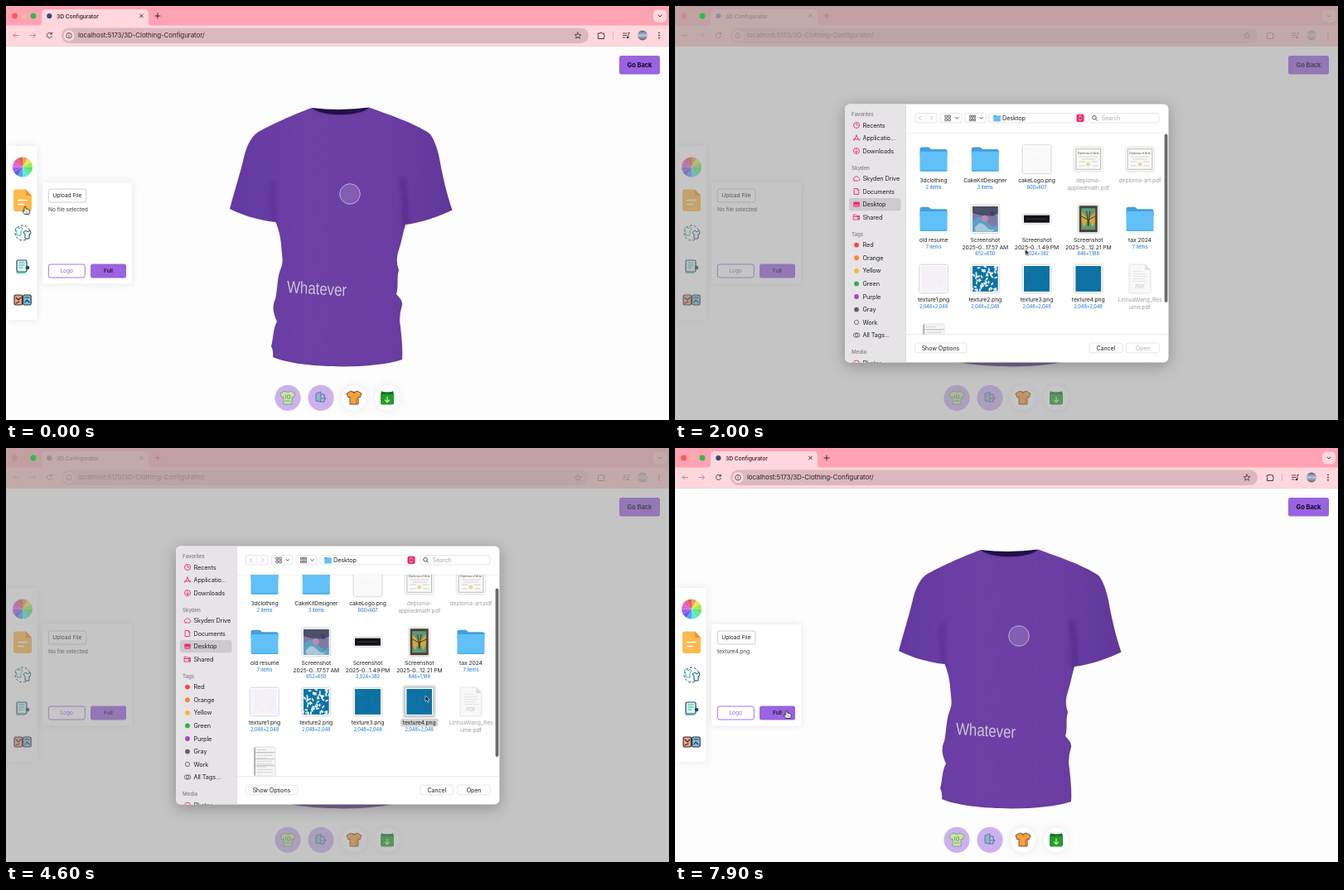
These frames come from a looping animation (800x500 px, 8 s). An HTML page:

```html
<!DOCTYPE html>
<html lang="en">
<head>
<meta charset="utf-8">
<title>3D Configurator</title>
<style>
html, body { margin: 0; width: 100%; height: 100%; overflow: hidden; background: #fdfdfd; }
svg { display: block; }
#stage { width: 800px; height: 500px; }
text { font-family: Inter, "Open Sans", sans-serif; letter-spacing: -.1px; white-space: pre; }
.mid { text-anchor: middle; }
.arial { font-family: "Liberation Sans", Arial, sans-serif; letter-spacing: 0; }
.soft { filter: drop-shadow(0 0 5px rgba(0,0,0,.09)); }
.deep { filter: drop-shadow(0 4px 9px rgba(0,0,0,.28)); }
.thumb { filter: drop-shadow(0 .5px .8px rgba(0,0,0,.4)); }

.move, .hand, .arrow, .dialog, .shade, .scroll, .bar, .picked, .unpicked, .named, .unnamed {
  animation: 8s linear infinite;
}
.move { animation-name: move; }
.scroll { animation-name: scroll; }
.bar { animation-name: bar; }
.hand, .arrow, .dialog, .shade, .picked, .unpicked, .named, .unnamed { animation-timing-function: step-end; }
.hand { animation-name: hand; }
.arrow { animation-name: arrow; }
.dialog { animation-name: dialog; }
.shade { animation-name: shade; }
.picked { animation-name: picked; }
.unpicked { animation-name: unpicked; }
.named { animation-name: named; }
.unnamed { animation-name: unnamed; }

@keyframes move {
  0% { transform: translate(23px, 242px); }
  3.75% { transform: translate(23px, 242px); animation-timing-function: steps(6); }
  11.25% { transform: translate(64.5px, 228px); }
  16.25% { transform: translate(64.5px, 228px); animation-timing-function: steps(7); }
  25% { transform: translate(422.5px, 293.5px); animation-timing-function: steps(14); }
  42.5% { transform: translate(506px, 299px); }
  73.75% { transform: translate(506px, 299px); animation-timing-function: steps(14); }
  91.25%, 100% { transform: translate(134.5px, 317px); }
}
@keyframes hand {
  0% { opacity: 1; } 6.25% { opacity: 0; }
  58.75% { opacity: 1; } 66.25% { opacity: 0; }
  91.25%, 100% { opacity: 1; }
}
@keyframes arrow {
  0% { opacity: 0; } 6.25% { opacity: 1; }
  58.75% { opacity: 0; } 66.25% { opacity: 1; }
  91.25%, 100% { opacity: 0; }
}
@keyframes dialog {
  0% { opacity: 0; transform: translateY(-15px); }
  13.75% { opacity: .5; transform: translateY(-11px); }
  15% { opacity: 1; transform: translateY(-5.5px); }
  16.25% { opacity: 1; transform: translateY(-2px); }
  17.5% { opacity: 1; transform: none; }
  58.75% { opacity: .75; transform: translateY(-8px); }
  60% { opacity: .36; transform: translateY(-15px); }
  61.25% { opacity: .08; transform: translateY(-17px); }
  62.5%, 100% { opacity: 0; transform: translateY(-17px); }
}
@keyframes shade {
  0% { opacity: 0; } 13.75% { opacity: .3; } 15% { opacity: .63; }
  16.25% { opacity: .87; } 17.5% { opacity: 1; }
  58.75% { opacity: .6; } 60% { opacity: .28; } 61.25% { opacity: .08; }
  62.5%, 100% { opacity: 0; }
}
@keyframes scroll {
  0% { transform: none; }
  32.5% { transform: translateY(0); animation-timing-function: steps(8); }
  42.5%, 100% { transform: translateY(-23px); }
}
@keyframes bar {
  0% { transform: none; }
  32.5% { transform: translateY(0); animation-timing-function: steps(8); }
  42.5%, 100% { transform: translateY(15px); }
}
@keyframes picked { 0% { opacity: 0; } 52.5%, 100% { opacity: 1; } }
@keyframes unpicked { 0% { opacity: 1; } 52.5%, 100% { opacity: 0; } }
@keyframes named { 0% { opacity: 0; } 61.25%, 100% { opacity: 1; } }
@keyframes unnamed { 0% { opacity: 1; } 61.25%, 100% { opacity: 0; } }
</style>
</head>
<body>
<svg id="stage" viewBox="0 0 800 500"></svg>
<script>
const PURPLE = '#9a63e0', PINK = '#f0286a', BLUE = '#1474d4';

const text = (x, y, s, size = 7, fill = '#222', more = '') =>
  `<text x="${x}" y="${y}" font-size="${size}" fill="${fill}" ${more}>${s}</text>`;
const label = (x, y, s, size = 7, fill = '#222', more = '') => text(x, y, s, size, fill, `class="mid" ${more}`);
const rect = (x, y, w, h, r, fill, more = '') =>
  `<rect x="${x}" y="${y}" width="${w}" height="${h}" rx="${r}" fill="${fill}" ${more}/>`;
const dot = (x, y, r, fill, more = '') => `<circle cx="${x}" cy="${y}" r="${r}" fill="${fill}" ${more}/>`;
const shape = (d, fill, more = '') => `<path d="${d}" fill="${fill}" ${more}/>`;
const line = (d, color = '#222', w = 1) =>
  `<path d="${d}" fill="none" stroke="${color}" stroke-width="${w}" stroke-linecap="round" stroke-linejoin="round"/>`;
const at = (x, y, s, more = '', k = 1) => `<g transform="translate(${x} ${y}) scale(${k})" ${more}>${s}</g>`;
const group = (name, s) => `<g class="${name}">${s}</g>`;

let seed = 7;
const rnd = () => (seed = seed * 16807 % 2147483647) / 2147483647;
const times = (n, f) => Array.from({ length: n }, (_, i) => f(i)).join('');

// Browser frame
function browser() {
  const ink = '#4a3338';
  return rect(0, 0, 800, 25, 0, '#ffa2b3')
    + dot(10.5, 12, 3.4, '#fb5a55') + dot(22, 12, 3.4, '#fdb5a0') + dot(33, 12, 3.4, '#2bbf45')
    + shape('M39 24Q43 24 43 19V9Q43 4 48 4H167Q172 4 172 9V19Q172 24 176 24Z', '#ffd7dc')
    + rect(0, 23.5, 800, 25, 0, '#ffd7dc') + rect(0, 48, 800, .7, 0, '#e8c9cd')
    + dot(52.3, 12, 3.1, '#3d4774')
    + text(61, 14.5, '3D Configurator', 6.8, '#2d1d21', 'font-weight="500"')
    + line('M161.5 10L165.3 13.8M165.3 10L161.5 13.8M183 9V15M180 12H186', '#2d1d21', .9)
    + rect(781, 4.5, 16, 15, 5, '#ffd7dc') + line('M787 11L789 13L791 11', ink)
    + line('M9 35.5H15.5M11.5 33L9 35.5L11.5 38', '#a8868c', .9)
    + line('M29 35.5H35.5M33 33L35.5 35.5L33 38', '#a8868c', .9)
    + line('M55 33.5A3.1 3.1 0 1 0 55.4 36.5M55.3 32V34H53.3', ink, .9)
    + rect(67, 26.5, 636, 18.5, 9.2, '#dab8bd') + dot(76, 35.7, 6.5, '#f7dade')
    + dot(76, 35.7, 3.3, 'none', `stroke="${ink}" stroke-width=".8"`) + line('M76 35.5V37.3M76 33.9V34', ink, .8)
    + text(87, 38.3, 'localhost:5173/3D-Clothing-Configurator/', 8, '#33262a')
    + line('M690 32L691.1 34.5L693.8 34.7L691.7 36.5L692.4 39.2L690 37.7L687.6 39.2L688.3 36.5L686.2 34.7L688.9 34.5Z', ink, .8)
    + line('M714.5 33H717Q717.5 30.5 719.2 33H721.5V35Q723.5 36 721.5 37.5V39.5H714.5V37Q716 36 714.5 35Z', ink, 1)
    + rect(732, 31, .8, 9, 0, '#f5a5b4')
    + line('M744.5 33H749M744.5 35.5H749M744.5 38H747M751 38V32.5H752.5', ink, .9) + dot(750, 38, 1.3, ink)
    + dot(768, 35.5, 6, 'url(#avatar)')
    + times(3, i => dot(788, 32.3 + i * 3.2, .9, ink));
}

// Shirt with a few soft folds
const BODY = 'M369 123C347 131 318 144 303 153C294 160 290 171 287 183C282 204 275 226 270 245'
  + 'C286 253 305 259 325.5 261C328 268 331 276 332 288C333 303 335 307 332 316C327 327 328 340 325 354'
  + 'C321 362 322 371 327 381C322 390 323 400 320 411Q323 416 322 424C350 437 440 440 478 427'
  + 'C479 413 477 395 475 380Q475 370 478 361Q479 356 471 348C474 338 471 330 474 319'
  + 'Q470 308 473 298C477 286 479 274 482 264C502 262 522 254 538.5 246.5C531 225 526 201 523 184'
  + 'C520 169 515 158 511 154C494 142 462 131 438 122.5C428 134 380 134 369 123Z';

function shirt() {
  const fold = (d, w, o) => `<path d="${d}" fill="none" stroke="#2d145c" stroke-width="${w}" opacity="${o}"/>`;
  return shape('M369 123Q404 127 438 122.5L436 129Q404 137 371 128Z', '#21104a')
    + shape(BODY, 'url(#cloth)')
    + `<g clip-path="url(#bodyClip)"><g filter="url(#blur)">`
    + fold('M325 263Q320 238 323 212', 4, .25) + fold('M482 266Q483 236 478 208', 5, .35)
    + fold('M320 429Q400 446 480 432', 4, .15)
    + `</g></g>`
    + line('M370 124.5C381 134.5 427 134.5 437 124', '#5a3090', .8)
    + dot(415, 227, 12.3, '#c9bdd6', 'fill-opacity=".25" stroke="#c4b6d3" stroke-width=".9"')
    + `<text class="arial" transform="matrix(.82 .05 -.02 1 339 346)" font-size="20.5" fill="#cbc6d2">Whatever</text>`;
}

function wheel() {
  return times(12, i => {
    const p = a => `${12 * Math.sin(a)} ${-12 * Math.cos(a)}`, a = i * Math.PI / 6;
    return shape(`M0 0L${p(a)}A12 12 0 0 1 ${p(a + Math.PI / 6)}Z`, `hsl(${30 + i * 30} 75% 64%)`);
  });
}

// Left toolbar and upload panel
function tools() {
  const ink = '#24466b', teal = '#35b6a0';
  return rect(2, 169, 35.5, 210, 3, '#fff', 'class="soft"') + at(20, 194.5, wheel())
    + shape('M12 221.5H24L31 229V245Q31 248 28 248H12Q9 248 9 245V224.5Q9 221.5 12 221.5Z', '#fdb94d')
    + shape('M24 221.5L31 229H24Z', '#e8982f') + line('M15 234.5H25M15 239.5H21', '#fff', 1.7)
    + at(20, 274, `<circle r="9" fill="none" stroke="${ink}" stroke-width="1" stroke-dasharray="3 2"/>`
      + shape('M-9-5L-6-7L-4-5L-2-7L0-5L-2-2V3H-7V-2Z', '#fff', `stroke="${teal}"`)
      + shape('M1-1L4-3L6-1L9-3L10 0L8 2V7H3V2Z', '#dff', `stroke="${ink}"`))
    + at(20, 314, rect(-7, -7, 12, 14, 1.5, '#d8f5ef', `stroke="${ink}" stroke-width="1.2"`)
      + line('M-4-4H2M-4-1H2M-4 2H0', teal, 1.2) + dot(6, 2, 2.3, ink) + line('M-7 8H3', teal, 1.5))
    + at(20, 355, rect(-10, -6, 9.5, 12, 1.5, '#f2a27e', 'stroke="#2b2b38" stroke-width="1.1"')
      + rect(.7, -6, 9.5, 12, 1.5, '#7cc6df', 'stroke="#2b2b38" stroke-width="1.1"')
      + line('M-8-3L-5 0L-2-3M-8 4L-4 2M3-3H8M3 3L5 0L8 3', '#2b2b38', 1.1))
    + rect(44, 213, 108, 122.5, 2, '#fff', 'class="soft"')
    + rect(51.3, 221, 45.5, 16, 2.5, '#fff', 'stroke="#b9b9b9" stroke-width=".7"')
    + label(73.8, 231.4, 'Upload File', 6.8)
    + group('unnamed', text(51, 248.4, 'No file selected', 6.7, '#444'))
    + group('named', text(51, 248.4, 'texture4.png', 6.7, '#444'))
    + rect(51.3, 312, 44, 16, 2.5, '#fff', `stroke="${PURPLE}" stroke-width=".9"`)
    + label(73.2, 322.4, 'Logo', 6.7, PURPLE) + rect(102, 311.6, 43, 16.8, 2.5, PURPLE)
    + label(123.4, 322.4, 'Full', 6.7, '#160a28', 'font-weight="500"');
}

function buttons() {
  const tee = 'M-9-5L-4-8Q0-5 4-8L9-5L7 0L5-1V8H-5V-1L-7 0Z';
  return rect(740, 60, 49, 22.5, 2.5, PURPLE) + label(764.5, 73.8, 'Go Back', 7.6, '#120820', 'font-weight="700"')
    + dot(340, 473.3, 15.6, '#ccb1ef') + dot(380, 473.3, 15.6, '#ccb1ef')
    + dot(420, 473.3, 15, '#fff', 'class="soft"') + dot(460, 473.3, 15, '#fff', 'class="soft"')
    + at(340, 473, shape(tee, '#c7e5a3', 'stroke="#7ea371" stroke-width=".9"')
      + line('M-2.5-3V1M0-3H2.5V1H0ZM-3 4H3', '#7a9a70', .9))
    + at(380, 473, shape('M-6-5L0-7V5L-6 4Z', '#8bb6cf', 'stroke="#47738f" stroke-width=".8"')
      + line('M0-4H4V-1M0 5H4V3M1 1H6L4-1M6 1L4 3', '#47738f', .9))
    + at(420, 473, shape(tee, '#f6a13c', 'stroke="#6b4526" stroke-width=".9"')
      + line('M-2-7Q0-4 2-7M3 1V7', '#6b4526', .9) + rect(2, 1, 4, 6, 1, '#d9853b'))
    + at(460, 473, rect(-8, -7, 16, 15.5, 2, '#239b36')
      + shape('M-7-8L-3-6Q0-4 3-6L7-8V-4H-7Z', '#176b2a') + line('M0-1V5M-2.5 3L0 5.5L2.5 3', '#d9f57a', 1.2));
}

// Grey veil over the inactive window, with a duller browser frame
function veil() {
  return rect(0, 0, 800, 500, 0, '#8c8c8c', 'opacity=".5"')
    + rect(0, 0, 800, 48.5, 0, '#c0a6a5', 'opacity=".6"') + dot(33, 12, 3.4, '#2bbf45');
}

// File dialog
function sidebar() {
  const head = (y, s) => text(213, y + 2.2, s, 6.2, '#8b888c', 'font-weight="600"');
  const item = (y, s, icon) => text(226.5, y + 2.6, s, 7.3) + at(219, y, icon);
  const ring = `<circle r="3.5" fill="none" stroke="${PINK}" stroke-width=".9"/>`;
  const tags = [['Red', '#f8454b'], ['Orange', '#f78338'], ['Yellow', '#f3b83a'], ['Green', '#2fb344'],
    ['Purple', '#a649c3'], ['Gray', '#626264']];
  const hollow = x => `<circle cx="${x}" r="2.6" fill="none" stroke="#555" stroke-width=".8"/>`;
  return rect(205, 118.5, 73.5, 312, 0, '#e6e4e7') + rect(278, 118.5, .6, 312, 0, '#d5d3d6')
    + head(131, 'Favorites') + item(144, 'Recents', ring + line('M0-2V0H1.7', PINK, .8))
    + item(159.5, 'Applicatio...', line('M-3.3 3L.3-3.5M-.3-3.5L3.3 3M-3.8 1.3H3.8', PINK, .9))
    + item(175, 'Downloads', ring + line('M0-2V2M-1.5.5L0 2L1.5.5', PINK, .8))
    + head(195.5, 'Skyden')
    + item(208.5, 'Skyden Drive', line('M-2.5 2.5H2.5A1.7 1.7 0 0 0 2.6-.8A2.7 2.7 0 0 0-2.4-1.2A1.9 1.9 0 0 0-2.5 2.5Z', PINK, .9))
    + item(224, 'Documents', line('M-2.5-3.5H1L2.7-1.7V3.5H-2.5ZM1-3.5V-1.7H2.7', PINK, .9))
    + rect(210, 232, 62.5, 15.3, 3, '#cdcacd')
    + item(239.5, 'Desktop', rect(-3.7, -3, 7.4, 6, 1, PINK) + rect(-2.7, .8, 5.4, 1, 0, '#f3b7c9'))
    + item(255, 'Shared', line('M-3.5-2.7H-1L0-1.7H3.5V3H-3.5ZM-3.5-.5H3.5', PINK, .9) + dot(2, 1.5, 1.1, PINK))
    + head(275.5, 'Tags') + tags.map(([s, c], i) => item(288.6 + i * 15.6, s, dot(0, 0, 2.9, c))).join('')
    + item(382, 'Work', hollow(0)) + item(397.5, 'All Tags...', hollow(-1) + hollow(1.2))
    + head(418, 'Media') + item(431.5, 'Photos', ring);
}

const folder = () => shape('M-16.5-12Q-16.5-14.5-14-14.5H-6L-3-12H14Q16.5-12 16.5-9.5V-4H-16.5Z', '#41a0dd')
  + rect(-16.5, -9.3, 33, 24, 2, '#62c0f8') + rect(-16.5, 13.2, 33, 1.2, .6, '#48a7e4');
const tile = (fill, inside = '') => rect(-16.7, -16.7, 33.4, 33.4, .8, '#fff', 'class="thumb"')
  + `<svg x="-15.5" y="-15.5" width="31" height="31" viewBox="0 0 31 31">${rect(0, 0, 31, 31, 0, fill)}${inside}</svg>`;
const streaks = (n, color) => times(n, () => {
  const x = rnd() * 31, y = rnd() * 31;
  return line(`M${x} ${y}l3 4`, color, .4);
});
const leaves = () => times(56, () =>
  `<ellipse rx="2.1" ry="1" fill="#e8f1f5" transform="translate(${rnd() * 31} ${rnd() * 31}) rotate(${rnd() * 180})"/>`);
const diploma = () => rect(-17, -14.5, 34, 29, .5, '#f6f6f4', 'class="thumb"')
  + rect(-14.8, -12.3, 29.6, 24.6, 0, 'none', 'stroke="#9a9a98" stroke-width="1"')
  + label(0, -6, 'Diploma of Arts', 3.6, '#333', 'font-weight="600"')
  + line('M-11-3H11M-8 0H8M-11 3H-4M4 3H11M-11 8H-5M5 8H11', '#a0a0a0', .7) + dot(0, 6, 2.6, '#dfcb60');
const page = () => shape('M-12.5-17H6L12.5-10.5V17H-12.5Z', '#f5f5f5', 'class="thumb"')
  + shape('M6-17V-10.5H12.5Z', '#ccc') + line('M-8-9H3M-8-6H8M-8-3H8M-8 0H6M-8 3H8', '#cfcfcf', .8)
  + label(0, 12, 'PDF', 6, '#999');
const form = () => rect(-12.5, -17, 25, 34, 0, '#f2f2f2', 'class="thumb"')
  + rect(-12.5, -17, 1.5, 34, 0, '#777') + line('M-12-11H12M-12-3H12M-12 5H12', '#777', .7)
  + times(9, i => line(`M-9 ${-14 + i * 3.4}H${i % 3 ? 9 : 2}`, '#a8a8a8', .8));
const picture = () => tile('#7d7aa6', shape('M0 0H31V9Q18 15 0 8Z', '#4c5068') + shape('M0 31V18Q10 8 18 19T31 20V31Z', '#5d9fc4')
  + dot(15, 15, 4, '#b58bb8') + shape('M3 26Q9 16 16 24T28 26L24 31H4Z', '#a9c8d8') + dot(24, 9, 3, '#474068'));
const strip = () => rect(-16.5, -5.5, 33, 11, .6, '#fff', 'class="thumb"') + rect(-15.5, -4.5, 31, 9, 0, '#111318')
  + line('M-12 0H11', '#3c4250', .8);
const painting = () => rect(-12, -17, 24, 34, .6, '#fff', 'class="thumb"') + rect(-11, -16, 22, 32, 0, '#4a4034')
  + rect(-8.5, -13, 17, 26, 0, '#5f9a78') + shape('M0 0L-8-9V4L-5 10ZM0 0L8-9V4L5 10Z', '#d8a43c')
  + line('M-2-9L0 8L2-9M-8-3L0 1L8-3', '#262219', .8);

const COLS = [312, 374.3, 436.5, 498.7, 561];
function file(col, row, icon, names = [], sub = '', muted = false) {
  const y = 185 + row * 72.2, x = COLS[col];
  return at(x, y, icon, muted ? 'opacity=".65"' : '')
    + names.map((s, i) => label(x, y + 28 + i * 8.6, s, 6.8, muted ? '#a2a2a2' : '#222')).join('')
    + (sub && label(x, y + 27.7 + names.length * 8.1, sub, 5.7, BLUE));
}

function files() {
  const blue = '#0d72a3', big = '2,048×2,048';
  return group('picked', rect(478.7, 309.5, 40, 39.5, 3, '#dcdcdc') + rect(476, 349.8, 45.5, 9.8, 2.5, '#d3d3d3'))
    + file(0, 0, folder(), ['3dclothing'], '2 items')
    + file(1, 0, folder(), ['CakeKitDesigner'], '3 items')
    + file(2, 0, tile('#f9f9f9', line('M9 18Q12 12 15 16T22 14', '#efefef', .8)), ['cakeLogo.png'], '600×607')
    + file(3, 0, diploma(), ['deploma-', 'appliedmath.pdf'], '', true)
    + file(4, 0, diploma(), ['deploma-art.pdf'], '', true)
    + file(0, 1, folder(), ['old resume'], '7 items')
    + file(1, 1, picture(), ['Screenshot', '2025-0...17.57 AM'], '652×650')
    + file(2, 1, strip(), ['Screenshot', '2025-0...1.49 PM'], '2,024×382')
    + file(3, 1, painting(), ['Screenshot', '2025-0...12.21 PM'], '846×1,188')
    + file(4, 1, folder(), ['tax 2024'], '7 items')
    + file(0, 2, tile('#f6f1f9', streaks(14, '#eae1f0')), ['texture1.png'], big)
    + file(1, 2, tile(blue, leaves()), ['texture2.png'], big)
    + file(2, 2, tile(blue, streaks(16, '#2b86b2')), ['texture3.png'], big)
    + file(3, 2, tile(blue), ['texture4.png'], big)
    + file(4, 2, page(), ['LinhuaWang_Res', 'ume.pdf'], '', true)
    + file(0, 3, form(), [], '', true);
}

function dialog() {
  const box = (x, y, w, h) => rect(x, y, w, h, 3, '#fff', 'stroke="#dcdcdc" stroke-width=".7"');
  const chevron = x => line(`M${x - 1.8} 134.5L${x} 136.3L${x + 1.8} 134.5`, '#444', .9);
  const grid = (x, n) => times(n * 2, i =>
    rect(x + i % n * (8 / n), 132 + Math.floor(i / n) * 4, 5.2 / n, 2.8, .4, 'none', 'stroke="#444" stroke-width=".8"'));
  return rect(205, 118.5, 390.5, 312, 6, '#fff', 'class="deep"')
    + `<g clip-path="url(#dialogClip)">` + sidebar()
    + box(289.5, 129.5, 26.5, 11.5) + line('M296.8 133L294.6 135.3L296.8 137.6', '#b5b5b5', .9)
    + line('M308.6 133L310.8 135.3L308.6 137.6', '#b5b5b5', .9) + rect(302.5, 131, .6, 9, 0, '#ddd')
    + box(320, 129.5, 26, 11.5) + grid(325.8, 2) + chevron(339.8)
    + box(350, 129.5, 25, 11.5) + grid(355.5, 3) + chevron(369.5)
    + box(379, 129.5, 116, 11.5) + at(388.5, 135.5, folder(), '', .26)
    + text(395, 138, 'Desktop', 7.3)
    + rect(484.5, 130.7, 9, 9.3, 2, PINK) + line('M487.3 134.2L489 132.5L490.7 134.2M487.3 136.5L489 138.2L490.7 136.5', '#fff', .9)
    + box(499.5, 129.5, 84.5, 11.5) + dot(506, 134.8, 2.3, 'none', 'stroke="#444" stroke-width=".9"')
    + line('M507.8 136.6L509.5 138.3', '#444', .9) + text(514.5, 138, 'Search', 7.1, '#aaa')
    + rect(279, 152.8, 317, .6, 0, '#e3e3e3')
    + `<g clip-path="url(#listClip)">` + group('scroll', files()) + `</g>`
    + group('bar', rect(590.6, 154.5, 3.8, 203.5, 1.9, '#6b6b6b'))
    + rect(279, 396.5, 317, .7, 0, '#dedede')
    + box(289.3, 407, 62.7, 11.8) + label(320.4, 415.5, 'Show Options', 7.1)
    + box(500, 407, 39.7, 11.8) + label(519.8, 415.5, 'Cancel', 7.1)
    + box(544.5, 407, 40, 11.8)
    + group('unpicked', label(564.5, 415.5, 'Open', 7.1, '#b7b7b7')) + group('picked', label(564.5, 415.5, 'Open', 7.1))
    + `</g>`;
}

function pointer() {
  const arrow = shape('M0 0V7.2L1.7 5.7L2.9 8.4L4.2 7.8L3 5.2H5.2Z', '#111', 'stroke="#fff" stroke-width=".6"');
  const hand = shape('M-1 .8Q0-.6 1 .8V3.2Q2.2 2.6 2.8 3.5Q4.2 3.1 4.4 4.2Q5.6 4 5.6 5.2V7L4.8 9.5H-.4L-3 6.2Q-3.2 4.9-1.9 5.2L-1 6Z',
    '#fff', 'stroke="#111" stroke-width=".8" stroke-linejoin="round"') + line('M1.3 5.8V8M3 5.8V8', '#111', .4);
  return group('move', group('arrow', arrow) + group('hand', hand));
}

const defs = `<defs>
  <linearGradient id="cloth"><stop offset="0" stop-color="#6339a0"/><stop offset=".35" stop-color="#6d40a6"/>
    <stop offset=".7" stop-color="#6b3ea3"/><stop offset="1" stop-color="#613799"/></linearGradient>
  <linearGradient id="avatar" x2="0" y2="1"><stop offset="0" stop-color="#4f6688"/><stop offset=".5" stop-color="#b9c6d8"/>
    <stop offset="1" stop-color="#5a5a70"/></linearGradient>
  <filter id="blur" x="-20%" y="-20%" width="140%" height="140%"><feGaussianBlur stdDeviation="2.4"/></filter>
  <clipPath id="bodyClip"><path d="${BODY}"/></clipPath>
  <clipPath id="dialogClip">${rect(205, 118.5, 390.5, 312, 6, '#000')}</clipPath>
  <clipPath id="listClip">${rect(279, 153.4, 317, 243, 0, '#000')}</clipPath>
</defs>`;

document.getElementById('stage').innerHTML = defs
  + rect(0, 0, 800, 500, 0, '#fdfdfd') + browser() + shirt() + tools() + buttons()
  + group('shade', veil()) + group('dialog', dialog()) + pointer();
</script>
</body>
</html>
```
